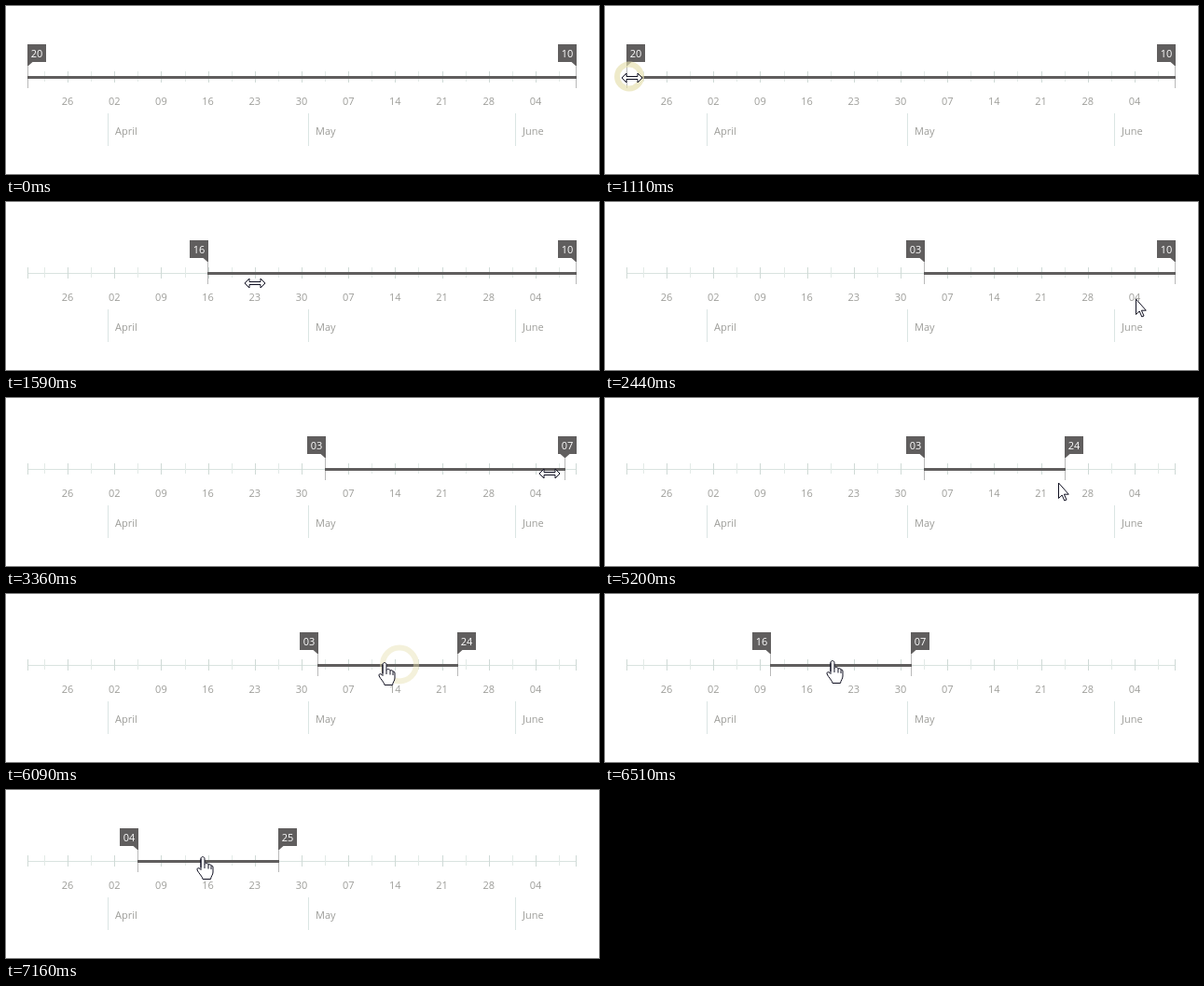
Recreate the animation shown at these times as an HTML page. Size 636 px wide and 180 px high, loop 7.99 s.

```html
<!DOCTYPE html>
<html lang="en">
<head>
<meta charset="utf-8">
<title>Date range slider</title>
<style>
html, body { margin: 0; width: 100%; height: 100%; overflow: hidden; background: #fff; }
svg { display: block; width: 636px; height: 180px; }
text { font: 11px "Open Sans", "Noto Sans", sans-serif; fill: #9d9d99; }
.flag text { fill: #fff; text-anchor: middle; }
.flag rect, .flag path, #bar { fill: #605e5e; }
.pointer { fill: #fff; stroke: #111122; stroke-width: 1; stroke-linejoin: round; }
</style>
</head>
<body>
<svg viewBox="0 0 636 180">
  <g id="scale"></g>
  <rect id="lineA" y="60" width="1" height="28" fill="#b9b9b9"/>
  <rect id="lineB" y="60" width="1" height="28" fill="#b9b9b9"/>
  <rect id="bar" y="75" height="3"/>
  <g id="flagA" class="flag"><rect y="41" width="20" height="19"/><path/><text y="55"></text></g>
  <g id="flagB" class="flag"><rect y="41" width="20" height="19"/><path/><text y="55"></text></g>
  <circle id="ring" fill="none" stroke="#e6dfae" stroke-width="6"/>
  <path id="arrow" class="pointer" d="M.5 0V16.5L4.2 13 6.8 19 9 18 6.4 12.2H11.3Z"/>
  <path id="size" class="pointer" d="M-11 0L-6-5V-1.5H6V-5L11 0 6 5V1.5H-6V5Z"/>
  <path id="hand" class="pointer" d="M-2 1.5C-2-1 2-1 2 1.5V7.5C3 6 6 6 6 8.3 7 7.3 9 7.5 9 9.3 10 8.5 11 9.3 11 11V16C11 19 9 20 8.5 23.5H0C0 21-4.5 17-5.8 14-6.8 11.5-4 10.5-2 13.5ZV11M2 7.5V12M6 8.3V12.5M9 9.3V13"/>
</svg>
<script>
const LOOP = 7990, LEFT = 23, RIGHT = 611, DAY = (RIGHT - LEFT) / 82;
const $ = id => document.getElementById(id);
const clamp = (v, lo, hi) => Math.min(hi, Math.max(lo, v));
const ease = (t, start, end) =>
  (1 - Math.cos(Math.PI * clamp((t - start) / (end - start), 0, 1))) / 2;
const pad = n => String(n).padStart(2, "0");
const dayX = d => LEFT + d * DAY;

// Day 0 is 20 March
const dateOf = d => new Date(Date.UTC(2018, 2, 20 + d)).getUTCDate();

function buildScale() {
  let out = "";
  const rect = (x, y, w, h, fill) =>
    out += `<rect x="${Math.round(x)}" y="${y}" width="${w}" height="${h}" fill="${fill}"/>`;
  rect(LEFT, 76, RIGHT - LEFT + 1, 1, "#d9e3e0");
  for (let d = 2.5; d < 82; d += 3.5) {
    const week = (d - 6) % 7 === 0;
    rect(dayX(d), 70, 1, week ? 12 : 11, week ? "#cfdad6" : "#e2eae7");
    if (week) out += `<text x="${dayX(d)}" y="106" text-anchor="middle">${pad(dateOf(d))}</text>`;
  }
  rect(LEFT, 70, 1, 12, "#cfdad6");
  rect(RIGHT, 70, 1, 12, "#cfdad6");
  [[12, "April"], [42, "May"], [73, "June"]].forEach(([d, name]) => {
    rect(dayX(d), 115, 1, 35, "#dbe5e3");
    out += `<text x="${Math.round(dayX(d)) + 8}" y="138">${name}</text>`;
  });
  $("scale").innerHTML = out;
}

// start, end, x, y, sag, shape before, shape after, switch point
const home = { x: -12, y: 88 };
const moves = [
  [490, 820, 24.5, 77, 0, "arrow", "size", 0.7],
  [1050, 1850, 343, 86.5, 4, "size", "size", 1],
  [2080, 2520, 588, 106, 0, "size", "arrow", 0.04],
  [2520, 2830, 615, 77, 0, "arrow", "size", 0.7],
  [3120, 3840, 486, 91.5, 0, "size", "arrow", 0.76],
  [5200, 5900, 422, 74.5, 0, "arrow", "hand", 0.45],
  [5957, 6707, 210.7, 72, 0, "hand", "hand", 1]
];

const clicks = [[1020, 26, 75.5], [3090, 614, 76], [5940, 422, 75.5]];

function pointerAt(t) {
  let { x, y } = home, shape = "arrow";
  for (const [start, end, toX, toY, sag, before, after, at] of moves) {
    if (t < start) break;
    const k = ease(t, start, end);
    x += (toX - x) * k;
    y += (toY - y) * k + sag * Math.sin(Math.PI * k);
    shape = k > at ? after : before;
  }
  return { x, y, shape };
}

// The handles trail the pointer, then snap to noon on release
function handlesAt(t) {
  const shift = -212 * ease(t, 5996, 6746) + 11.2 * ease(t, 6940, 7160);
  return [
    LEFT + (dayX(44.5) - LEFT) * ease(t, 1137, 1937) + shift,
    RIGHT - (RIGHT - 481) * ease(t, 3221, 3941) + (dayX(65.5) - 481) * ease(t, 4250, 4470) + shift
  ];
}

function labelLead(t) {
  return t < 2500 ? 5 : t < 5000 ? 35 : t < 7200 ? -100 : 0;
}

function drawFlag(id, h, x, label) {
  const [box, tip, text] = $(id).children;
  box.setAttribute("x", x);
  const c = h + 0.5, l = Math.max(x, c - 5), r = Math.min(x + 20, c + 5);
  tip.setAttribute("d", `M${l} 60H${r}L${clamp(c + 0.5, x, x + 20)} 64H${clamp(c - 0.5, x, x + 20)}Z`);
  text.setAttribute("x", x + 10);
  text.textContent = label;
}

function draw(t) {
  const [a, b] = handlesAt(t).map(Math.round);
  const [dayA, dayB] = handlesAt(t + labelLead(t))
    .map(x => pad(dateOf(Math.floor((x - LEFT) / DAY + 0.01))));
  $("lineA").setAttribute("x", a);
  $("lineB").setAttribute("x", b);
  $("bar").setAttribute("x", a);
  $("bar").setAttribute("width", b - a + 1);
  drawFlag("flagA", a, Math.max(LEFT, a - 19), dayA);
  drawFlag("flagB", b, Math.min(RIGHT - 19, b), dayB);

  const click = clicks.find(([at]) => t >= at && t < at + 270);
  $("ring").setAttribute("opacity", 0);
  if (click) {
    const age = (t - click[0]) / 270;
    $("ring").setAttribute("cx", click[1]);
    $("ring").setAttribute("cy", click[2]);
    $("ring").setAttribute("r", 5 + 13 * Math.min(1, age / 0.55));
    $("ring").setAttribute("opacity", 1 - age);
  }

  const p = pointerAt(t);
  for (const id of ["arrow", "size", "hand"]) {
    $(id).setAttribute("visibility", id === p.shape ? "visible" : "hidden");
    $(id).setAttribute("transform", `translate(${Math.round(p.x)} ${Math.round(p.y)})`);
  }
}

buildScale();
const began = performance.now();
function tick() {
  draw((performance.now() - began) % LOOP);
  requestAnimationFrame(tick);
}
tick();
</script>
</body>
</html>
```
